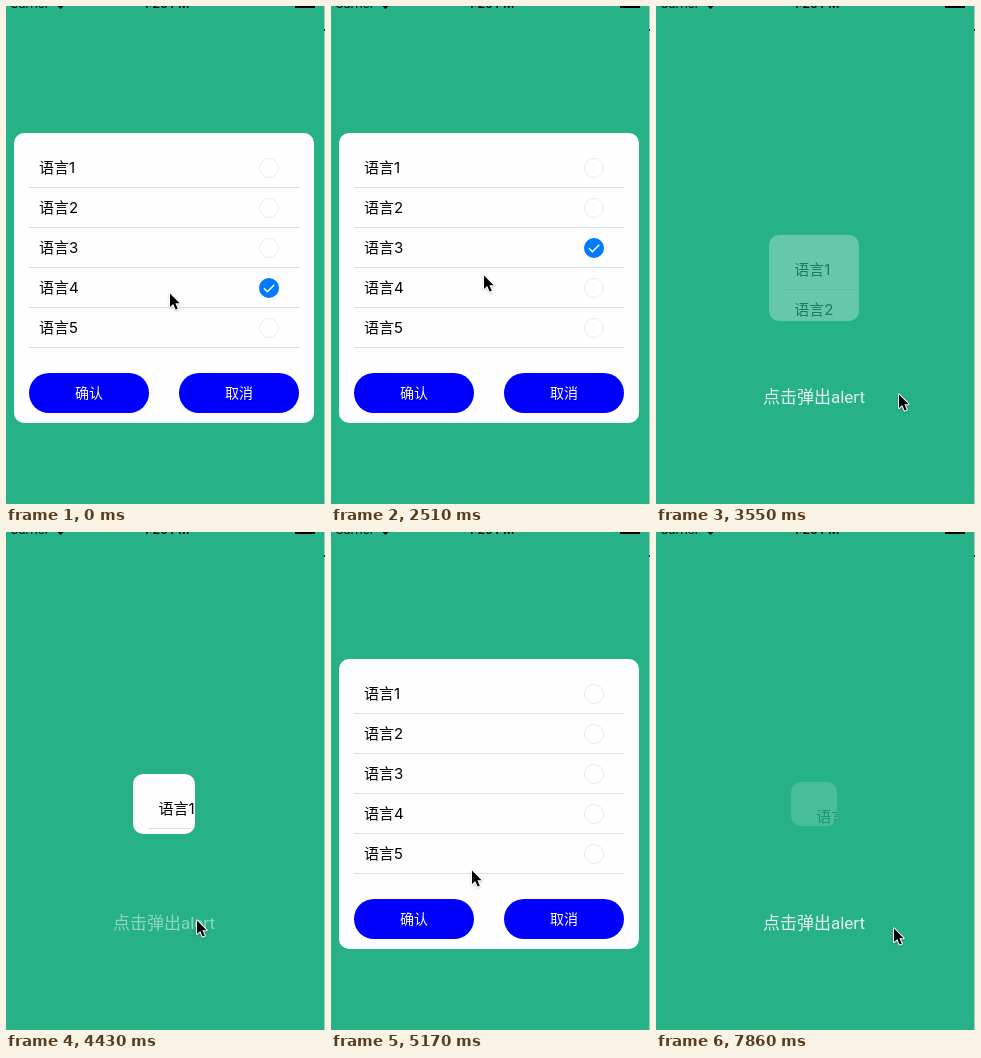
An HTML page that plays this animation: 319 by 498 pixels, repeating every 8 s.

```html
<!DOCTYPE html>
<html lang="zh-CN">
<head>
<meta charset="utf-8">
<title>Language picker</title>
<style>
html, body { margin: 0; width: 100%; height: 100%; overflow: hidden; }
#stage {
  position: relative; width: 319px; height: 498px; overflow: hidden;
  background: #26b187; color: #000;
  font-family: Inter, "Noto Sans CJK SC", "Noto Sans CJK", sans-serif;
}
#stage div, #stage svg { position: absolute; white-space: nowrap; }
.status { top: -9px; font-size: 12px; line-height: 14px; }
#time { left: 120px; width: 81px; text-align: center; font-weight: 600; }
#battery { left: 289px; top: 0; width: 20px; height: 2px; background: #000; }
#edge { left: 318px; top: 0; width: 1px; height: 498px; background: #a5c9bd; }
#mark { left: 318px; top: 23px; width: 1px; height: 2px; background: #222; }
#label {
  left: 58px; top: 371px; width: 200px; line-height: 40px; font-size: 17px;
  text-align: center; color: #fff;
  font-family: Roboto, "Noto Sans CJK SC", "Noto Sans CJK", sans-serif;
}
#card { overflow: hidden; border-radius: 10px; background: #fefefe; }
.row {
  left: 15px; width: 260px; height: 39px; padding-left: 10px;
  line-height: 40px; font-size: 15px; border-bottom: 1px solid #dedfe0;
}
.row svg { left: 230px; top: 10px; }
.row .on { visibility: hidden; }
.row.picked .on { visibility: visible; }
.button {
  top: 240px; width: 120px; height: 40px; border-radius: 20px; background: #00f;
  color: #fff; font-size: 14px; line-height: 40px; text-align: center;
}
#cursor { left: 0; top: 0; overflow: visible; filter: drop-shadow(0 1px 1px rgba(0,0,0,.2)); }
</style>
</head>
<body>
<div id="stage">
  <div class="status" style="left:4px">Carrier</div>
  <svg style="left:49px;top:0" width="12" height="4"><path d="M1.5-1H9.5L5.5 3Z"/></svg>
  <div class="status" id="time">1:26 PM</div>
  <div id="battery"></div>
  <div id="edge"></div>
  <div id="mark"></div>
  <div id="label">点击弹出alert</div>
  <div id="card">
    <div class="button" style="left:15px">确认</div>
    <div class="button" style="left:165px">取消</div>
  </div>
  <svg id="cursor" width="13" height="20">
    <path d="M1 1.5V15L4.2 12L6.6 17.6L8.8 16.7L6.4 11.2H10.6Z"
      stroke="#fff" stroke-width="2" stroke-linejoin="round" paint-order="stroke"/>
  </svg>
</div>
<script>
// The screen refreshes in even steps; all times below are counted in steps.
const LOOP = 8000, STEPS = 54;
const OPEN = 29.42, OPEN_TIME = 2, CLOSE_TIME = 1.3;
const $ = id => document.getElementById(id);
const card = $("card"), label = $("label"), cursor = $("cursor");

// pointer moves: begin, end, x, y
const moves = [
  [0, 2, 154, 249], [4, 9, 149, 159], [11, 17, 152, 268], [17, 21, 242, 387],
  [25, 29, 190, 387], [31, 35, 140, 337], [35, 39, 152, 284],
  [40, 43, 92, 379], [44, 47, 237, 395]
];
// clicks: step, chosen row (0 clears)
const clicks = [[0, 4], [4, 3], [7, 2], [11, 1], [14, 2], [17, 3], [25, 0], [40, 4]];

const rows = [1, 2, 3, 4, 5].map(n => {
  const row = document.createElement("div");
  row.className = "row";
  row.style.top = 15 + (n - 1) * 40 + "px";
  row.innerHTML = `语言${n}<svg width="20" height="20" fill="none">
    <circle cx="10" cy="10" r="9.5" stroke="#e9e9eb"/>
    <g class="on"><circle cx="10" cy="10" r="10" fill="#007aff"/>
    <path d="M5 10.3L8.4 13.7L15.3 6.7" stroke="#fff" stroke-width="1.5"/></g></svg>`;
  card.append(row);
  return row;
});

function ease(u) {
  u = Math.max(0, Math.min(1, u));
  return u * u * (3 - 2 * u);
}

function pointer(k) {
  let x = 163, y = 286;
  for (const [begin, end, toX, toY] of moves) {
    const u = ease((k - begin) / (end - begin));
    x += (toX - x) * u;
    y += (toY - y) * u;
  }
  return [Math.round(x), Math.round(y)];
}

// Opening only grows; closing shrinks and fades together.
function cardState(k) {
  const opening = k > 27 && k < 50;
  if (opening) return [ease((k - OPEN) / OPEN_TIME), 1];
  const s = 1 - ease((k - (k < 27 ? 23.17 : 52.02)) / CLOSE_TIME);
  return [s, s];
}

function draw(k) {
  const [scale, alpha] = cardState(k);
  const w = 300 * scale, h = 290 * scale;
  Object.assign(card.style, {
    left: 158 - w / 2 + "px", top: 272 - h / 2 + "px",
    width: w + "px", height: h + "px",
    opacity: alpha, display: scale > 0 ? "block" : "none"
  });

  const picked = clicks.filter(c => c[0] <= k).pop()[1];
  rows.forEach((row, i) => row.classList.toggle("picked", i + 1 === picked));

  label.style.opacity = Math.abs(k - OPEN) < 1 ? 0.48 : 0.87;
  const [x, y] = pointer(k);
  cursor.style.transform = `translate(${x}px,${y}px)`;
}

const start = performance.now();
function tick() {
  const t = (performance.now() - start) % LOOP;
  draw(Math.min(STEPS - 1, Math.floor(t / LOOP * STEPS + 0.12)));
  requestAnimationFrame(tick);
}
tick();
</script>
</body>
</html>
```
